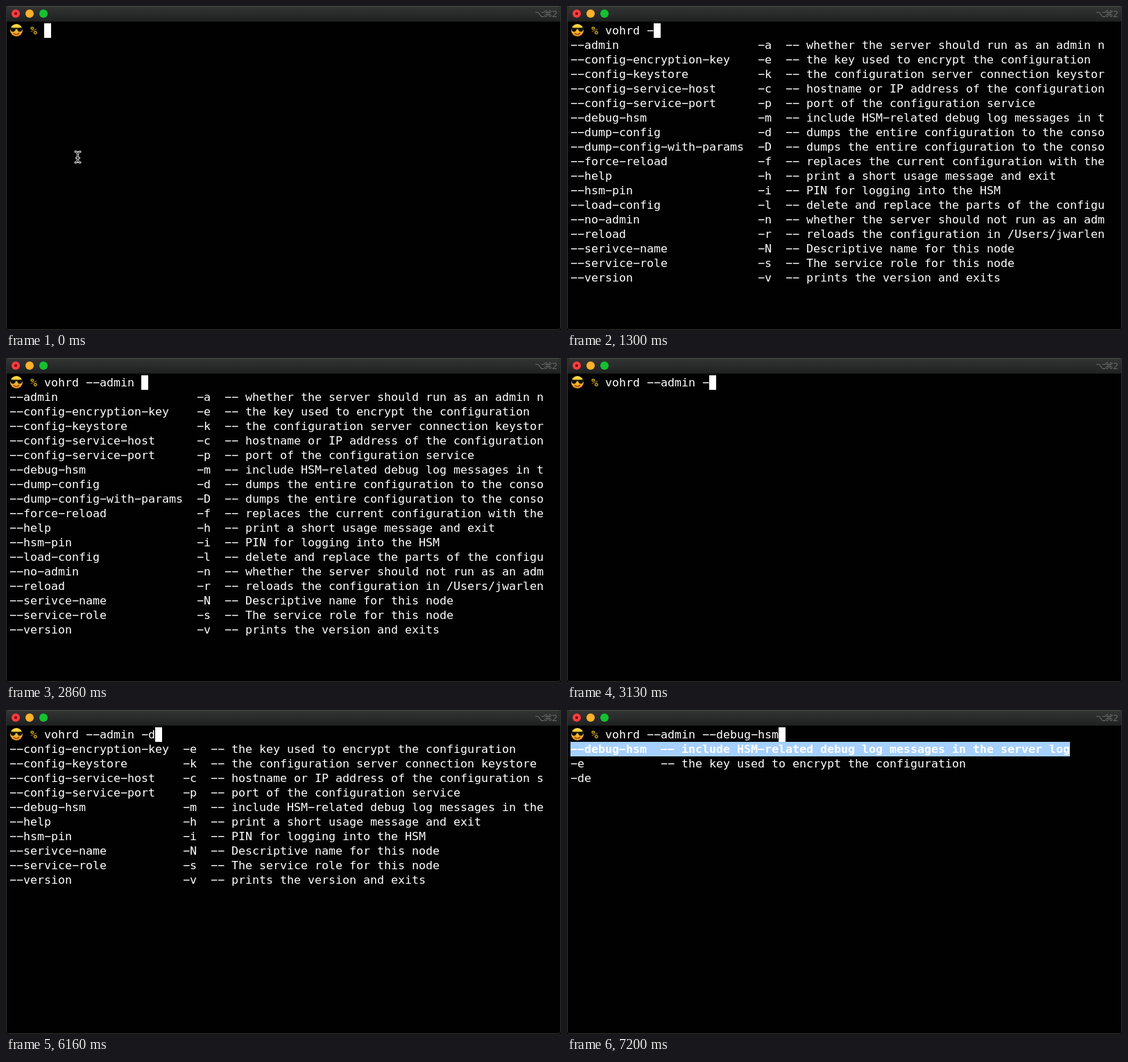
An HTML page with a canvas that plays this animation: 800x468 px, repeating every 8000 ms.

```html
<!DOCTYPE html>
<html lang="en">
<head>
<meta charset="utf-8">
<title>Terminal completion</title>
<style>
  html, body { margin: 0; width: 100%; height: 100%; overflow: hidden; background: #000; }
  canvas { display: block; }
</style>
</head>
<body>
<canvas id="stage" width="800" height="468"></canvas>
<script>
const ctx = document.getElementById('stage').getContext('2d');
const LOOP = 8000, LEFT = 5, TOP = 25, CELL = 10, ROW = 21, COLS = 77, PROMPT = 5;
const MONO = '16.61px "DejaVu Sans Mono", monospace';

const options = [
  ['admin', 'a', 'whether the server should run as an admin node'],
  ['config-encryption-key', 'e', 'the key used to encrypt the configuration'],
  ['config-keystore', 'k', 'the configuration server connection keystore'],
  ['config-service-host', 'c', 'hostname or IP address of the configuration service'],
  ['config-service-port', 'p', 'port of the configuration service'],
  ['debug-hsm', 'm', 'include HSM-related debug log messages in the server log'],
  ['dump-config', 'd', 'dumps the entire configuration to the console'],
  ['dump-config-with-params', 'D', 'dumps the entire configuration to the console'],
  ['force-reload', 'f', 'replaces the current configuration with the one on disk'],
  ['help', 'h', 'print a short usage message and exit'],
  ['hsm-pin', 'i', 'PIN for logging into the HSM'],
  ['load-config', 'l', 'delete and replace the parts of the configuration'],
  ['no-admin', 'n', 'whether the server should not run as an admin node'],
  ['reload', 'r', 'reloads the configuration in /Users/jwarlen'],
  ['serivce-name', 'N', 'Descriptive name for this node'],
  ['service-role', 's', 'The service role for this node'],
  ['version', 'v', 'prints the version and exits']
];

function listing(keys) {
  const shown = options.filter(([, key]) => keys.includes(key));
  const width = Math.max(...shown.map(([name]) => name.length)) + 4;
  return shown.map(([name, key, about]) =>
    `${('--' + name).padEnd(width)}-${key}  -- ${about}`.slice(0, COLS));
}

const command = 'vohrd --admin --debug-hsm';
const matches = [
  '--debug-hsm  -- include HSM-related debug log messages in the server log',
  '-e           -- the key used to encrypt the configuration',
  '-de'
];

// [start in ms, value]
const typed = [
  [0, ''],
  ...Array.from({ length: 6 }, (_, i) => [360 + (i + 1) * 500 / 6, command.slice(0, i + 1)]),
  [1060, command.slice(0, 7)],
  [2400, command.slice(0, 8)],
  [2500, command.slice(0, 9)],
  [2600, command.slice(0, 10)],
  [2860, command.slice(0, 14)],
  [3130, command.slice(0, 15)],
  [6160, command.slice(0, 14) + '-d'],
  [6760, command.slice(0, 14) + '-de'],
  [7200, command]
];
const lists = [
  [0, []],
  [1300, listing('aekcpmdDfhilnrNsv')],
  [3130, []],
  [3630, listing('ekcpmhiNsv')],
  [7200, matches]
];
const at = (steps, t) => steps.filter(([start]) => t + 0.01 >= start).pop()[1];

function rect(color, x, y, w, h) {
  ctx.fillStyle = color;
  ctx.fillRect(x, y, w, h);
}

function disc(color, x, y, r) {
  ctx.fillStyle = color;
  ctx.beginPath();
  ctx.arc(x, y, r, 0, 7);
  ctx.fill();
}

// The minus glyph gives the wide terminal dash.
function print(text, col, row, color = '#fff', style = '') {
  ctx.font = style + MONO;
  ctx.fillStyle = color;
  ctx.fillText(text.replace(/-/g, '\u2212'), LEFT + col * CELL, TOP + row * ROW + 16);
}

function shade(y0, y1, ...colors) {
  const g = ctx.createLinearGradient(0, y0, 0, y1);
  colors.forEach((c, i) => g.addColorStop(i / (colors.length - 1), c));
  return g;
}

function drawWindow() {
  rect('#010102', 0, 0, 800, 468);
  rect(shade(0, 22, '#333534', '#202221'), 0, 0, 800, 22);
  rect('#4c4e4d', 3, 0, 794, 1);
  rect('#111', 0, 22, 800, 1);
  ctx.strokeStyle = '#303131';
  ctx.lineWidth = 1;
  ctx.beginPath();
  ctx.moveTo(0.5, 3);
  ctx.lineTo(0.5, 464);
  ctx.quadraticCurveTo(0.5, 467.5, 4, 467.5);
  ctx.lineTo(796, 467.5);
  ctx.quadraticCurveTo(799.5, 467.5, 799.5, 464);
  ctx.lineTo(799.5, 3);
  ctx.stroke();
  ['#fc3b3f', '#fdb02a', '#14c232'].forEach((c, i) => disc(c, 14 + 20 * i, 11, 6));
  disc('#730508', 14, 11, 2);
  ctx.font = '13px "DejaVu Sans", Inter, sans-serif';
  ctx.fillStyle = '#686a69';
  ctx.textAlign = 'center';
  [['⌥', 769.5], ['⌘', 781], ['2', 791]].forEach(([s, x]) => ctx.fillText(s, x, 15.5));
  ctx.textAlign = 'left';
}

function drawFace() {
  disc(shade(26, 44, '#ffe04a', '#fbbd2c', '#e88720'), 15, 35, 9);
  ctx.fillStyle = '#111';
  ctx.beginPath();
  ctx.moveTo(5.5, 31);
  ctx.quadraticCurveTo(15, 32.2, 24.5, 31);
  ctx.lineTo(24, 33);
  ctx.bezierCurveTo(23, 38.5, 17, 38.5, 16, 33.5);
  ctx.lineTo(14, 33.5);
  ctx.bezierCurveTo(13, 38.5, 7, 38.5, 6, 33);
  ctx.fill();
  ctx.strokeStyle = '#7a3f10';
  ctx.lineWidth = 1.2;
  ctx.beginPath();
  ctx.arc(15, 36.5, 4.5, 0.5, 2.64);
  ctx.stroke();
}

function drawPointer() {
  const beam = new Path2D('M100 210.5Q103.5 211 103.5 213V223Q103.5 225.5 100 226' +
    'M107 210.5Q103.5 211 103.5 213M103.5 223Q103.5 225.5 107 226M101.5 219.5H105.5');
  ctx.lineCap = 'round';
  for (const [color, width] of [['#e8e8e8', 3], ['#000', 1]]) {
    ctx.strokeStyle = color;
    ctx.lineWidth = width;
    ctx.stroke(beam);
  }
  ctx.lineCap = 'butt';
}

function draw() {
  const t = performance.now() % LOOP;
  const line = at(typed, t), rows = at(lists, t);
  drawWindow();
  drawFace();
  print('%', 3, 0, '#c9a01c', 'bold ');
  print(line, PROMPT, 0);
  rect('#fff', LEFT + (PROMPT + line.length) * CELL, TOP, CELL, ROW);
  rows.forEach((text, i) => {
    const selected = rows === matches && i === 0;
    if (selected) rect('#a5d0ff', LEFT, TOP + ROW, text.length * CELL, ROW);
    print(text, 0, i + 1, '#fff', selected ? 'bold ' : '');
  });
  if (t < 360) drawPointer();
  requestAnimationFrame(draw);
}
draw();
</script>
</body>
</html>
```
